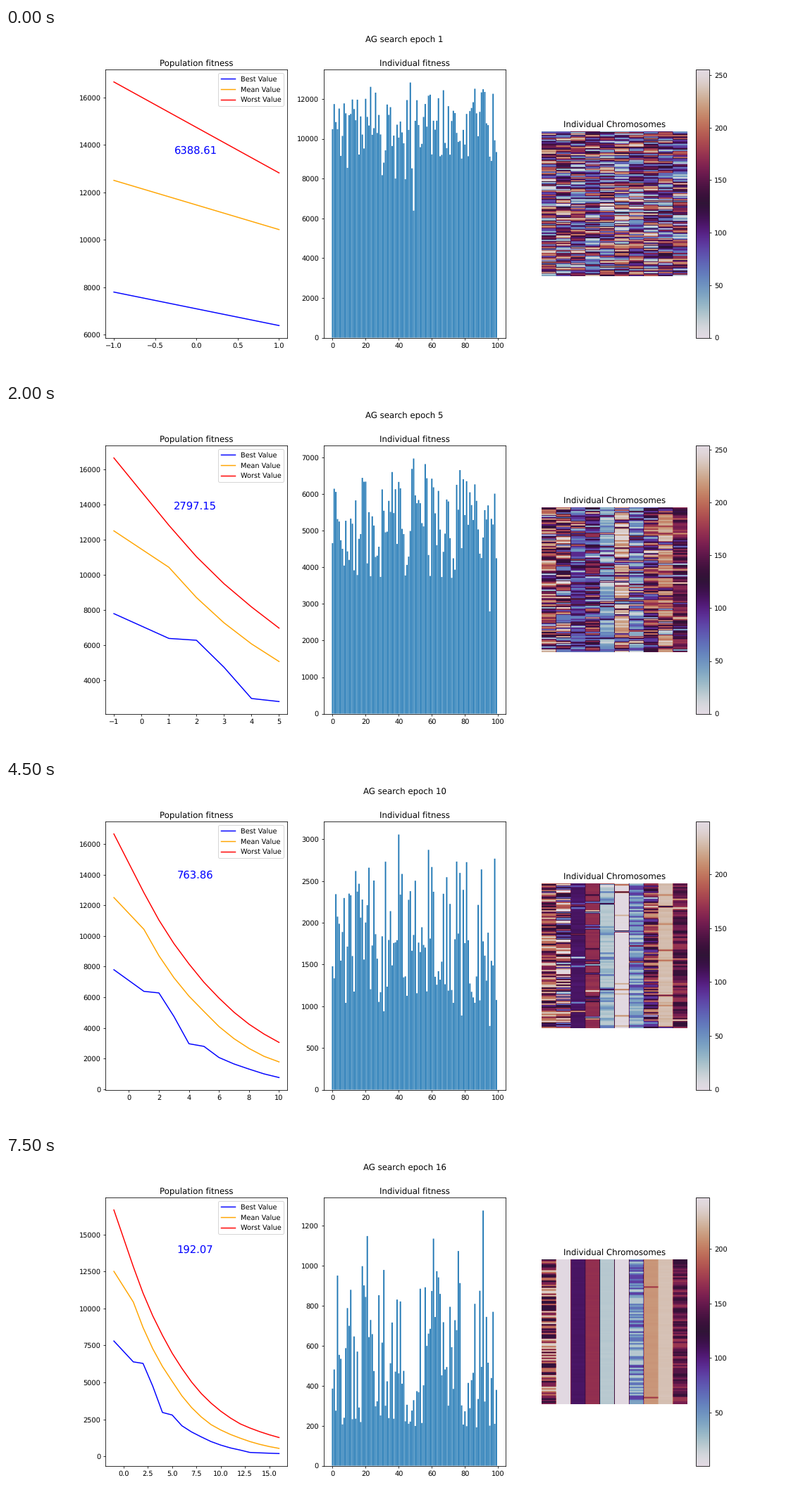
A matplotlib script that plays this animation: 1131 px wide and 495 px high, repeating every 8000 ms.

```python
import numpy as np
import matplotlib.pyplot as plt
from matplotlib.animation import FuncAnimation

W, H, DPI = 1131, 495, 1131 / 16
EPOCHS, SIZE = 16, 100
plt.rcParams.update({"font.family": "DejaVu Sans", "text.hinting": "no_hinting"})

# Key points (epoch: fitness), joined by exponential decay
BEST = {-1: 7800, 1: 6388.61, 2: 6285.34, 3: 4748.92, 4: 2969.8, 5: 2797.15,
        6: 2070.42, 8: 1315.51, 10: 763.86, 12: 427.16, 13: 266.58, 16: 192.07}
MEAN = {-1: 12510, 1: 10435, 5: 5075, 9: 2148, 12: 1232, 16: 540}
WORST = {-1: 16660, 1: 12825, 4: 8180, 6: 5950, 8: 4245, 12: 2200, 16: 1275}

# Largest gene value present
GENE_TOP = {4: 255, 6: 254, 8: 250, 10: 249, 12: 253, 16: 247}

# Per gene: epoch of takeover, winning allele, farthest rival
GENES = [(40, 120, 235), (13.5, 248, 60), (7, 107, 60), (8, 167, 60), (9.5, 20, 60),
         (7, 249, 208), (40, 85, 20), (14, 211, 90), (8, 229, 205), (40, 170, 130)]


def between(keys, x):
    return np.interp(x, list(keys), list(keys.values()))


def decay(keys, x):
    return np.exp(between({k: np.log(v) for k, v in keys.items()}, x))


def fitness(epoch, rng):
    low, mean, high = (decay(keys, epoch) for keys in (BEST, MEAN, WORST))
    m = (mean - low) / (high - low)
    k = 5 - 0.15 * epoch
    values = low + (high - low) * rng.beta(k * m, k * (1 - m), SIZE)
    values[values.argmin()], values[values.argmax()] = low, high
    return values


def chromosomes(epoch, rng):
    unsettled = np.exp(-(epoch - 1) / 3.2) * (epoch < EPOCHS)
    spread = 25 * np.exp(-epoch / 4)
    columns = []
    for takeover, winner, rival in GENES:
        lead = 1 / (1 + np.exp((takeover - epoch) / 0.8))
        genes = rng.choice(np.linspace(winner, rival, 4), SIZE)
        genes = np.where(rng.random(SIZE) < lead, winner, genes)
        genes = genes + rng.normal(0, spread, SIZE)
        wild = rng.uniform(0, 255, SIZE)
        columns.append(np.where(rng.random(SIZE) < unsettled, wild, genes))
    return np.repeat(np.column_stack(columns), SIZE // len(GENES), axis=1)


def draw(i):
    epoch = i + 1
    rng = np.random.default_rng(epoch)
    fig.clear()
    fig.suptitle(f"AG search epoch {epoch}")
    history, bars, genes = fig.subplots(1, 3)

    x = [-1, *range(1, epoch + 1)]
    for name, keys, color in (("Best", BEST, "blue"), ("Mean", MEAN, "orange"),
                              ("Worst", WORST, "red")):
        history.plot(x, decay(keys, x), color=color, label=f"{name} Value")
    history.set_title("Population fitness")
    history.legend(loc="upper right")
    best = round(float(decay(BEST, epoch)), 2)
    history.text(0.49 * epoch - 0.5, 13785 - 0.024 * best, str(best),
                 color="blue", fontsize=15, ha="center")

    bars.bar(range(SIZE), fitness(epoch, rng), snap=False)
    bars.set_title("Individual fitness")

    low, high = int(epoch >= 15), round(between(GENE_TOP, epoch))
    image = genes.imshow(chromosomes(epoch, rng).clip(low, high), cmap="twilight",
                         vmin=low, vmax=high, interpolation="hanning")
    genes.set_title("Individual Chromosomes")
    genes.axis("off")
    fig.colorbar(image, ax=genes)
    return []


fig = plt.figure(figsize=(W / DPI, (H + 1e-6) / DPI), dpi=DPI)
anim = FuncAnimation(fig, draw, frames=EPOCHS, init_func=lambda: [],
                     interval=500, repeat=True, repeat_delay=0)
plt.show()
```
